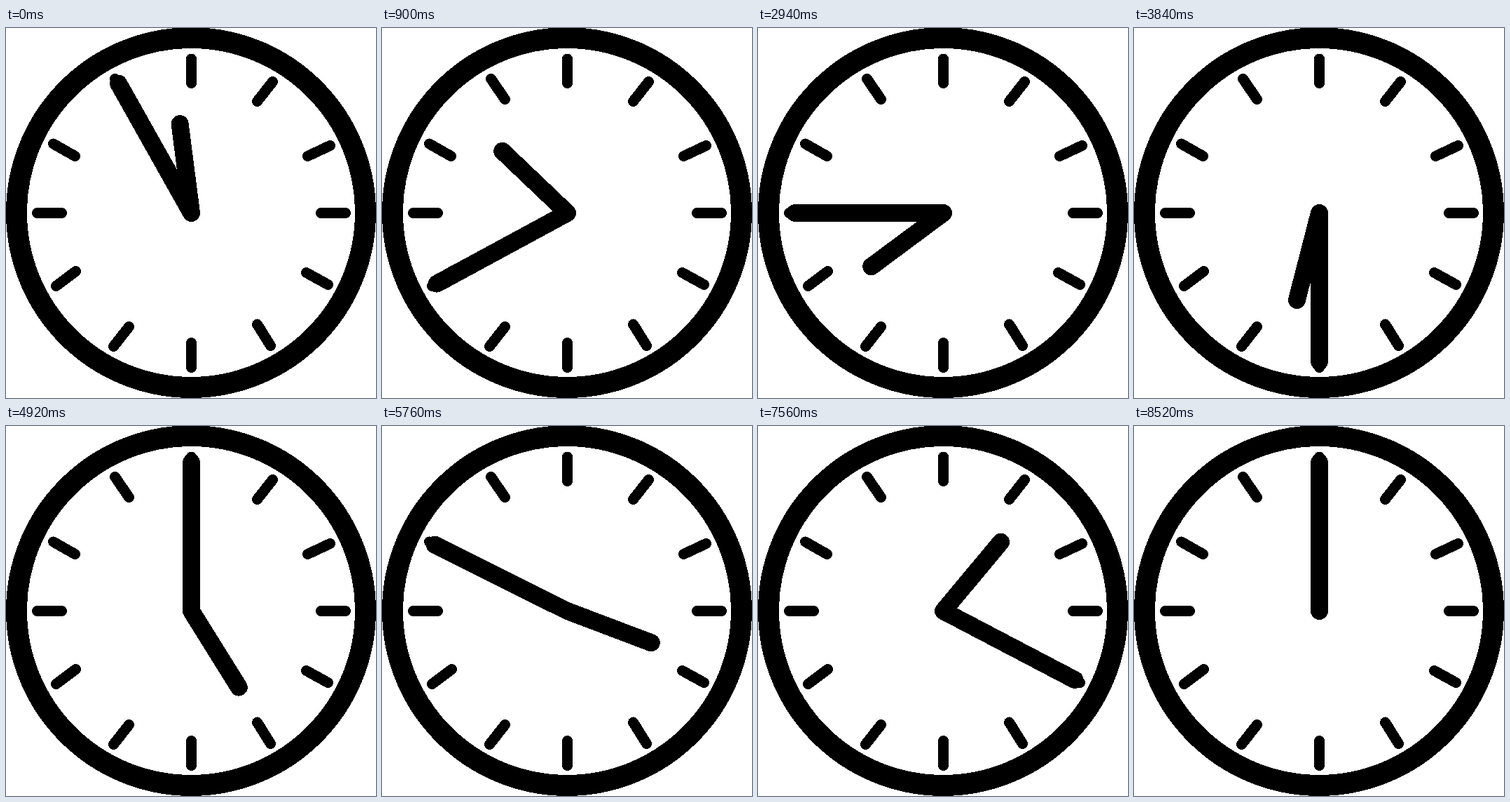
Animation, 528 px wide and 527 px high, one loop 8580 ms. Source, as an HTML page:

```html
<!DOCTYPE html>
<html lang="en">
<head>
<meta charset="utf-8">
<title>Clock running backwards</title>
<style>
  html, body { margin: 0; width: 100%; height: 100%; overflow: hidden; background: #fff; }
  svg { display: block; width: 528px; height: 527px; }
</style>
</head>
<body>
<svg viewBox="0 0 528 527" fill="none" stroke="#000" stroke-linecap="round" shape-rendering="crispEdges">
  <circle cx="264" cy="263" r="249" stroke-width="30"/>
  <path stroke-width="15" d="M264.5 44V78.5 M380.5 76.5L358.5 104.5 M462.5 167.5L430.5 182.5
    M484.5 263.5H449.5 M459.5 365.5L428.5 348.5 M377.5 452.5L358.5 422
    M264.5 483.5V448.5 M153.5 453.5L175.5 425.5 M71.5 367.5L99.5 346.5
    M44.5 263.5H79.5 M67.5 165L98.5 182.5 M155.5 72.5L175.5 101.5"/>
  <path id="hour" stroke-width="25" d="M264.5 263.5V135.5"/>
  <path id="minute" stroke-width="25" d="M264.5 263.5V52"/>
</svg>
<script>
  const STEP_MS = 60, STEPS = 143, SKIPPED = 20;
  // The dial is slightly uneven: direction of each hour mark in degrees.
  const marks = [0, 31.8, 64.1, 90, 117.6, 148, 180, 209, 241.6, 270, 296.5, 330.6, 360];
  const hourHand = document.getElementById('hour');
  const minuteHand = document.getElementById('minute');

  function dialAngle(position) {
    const i = Math.floor(position);
    return marks[i] + (marks[i + 1] - marks[i]) * (position - i);
  }

  function turn(hand, angle) {
    hand.setAttribute('transform', `rotate(${angle} 264.5 263.5)`);
  }

  function render(ms) {
    const step = Math.floor(ms / STEP_MS) % STEPS;
    // One five-minute position (10:15) is left out.
    const minutes = 715 - 5 * (step + (step >= SKIPPED ? 1 : 0));
    // The hour hand moves in quarter hours.
    turn(hourHand, dialAngle(Math.floor(minutes / 15) / 4));
    turn(minuteHand, dialAngle((minutes % 60) / 5));
  }

  const start = performance.now();
  function tick() {
    render(performance.now() - start);
    requestAnimationFrame(tick);
  }
  tick();
</script>
</body>
</html>
```
